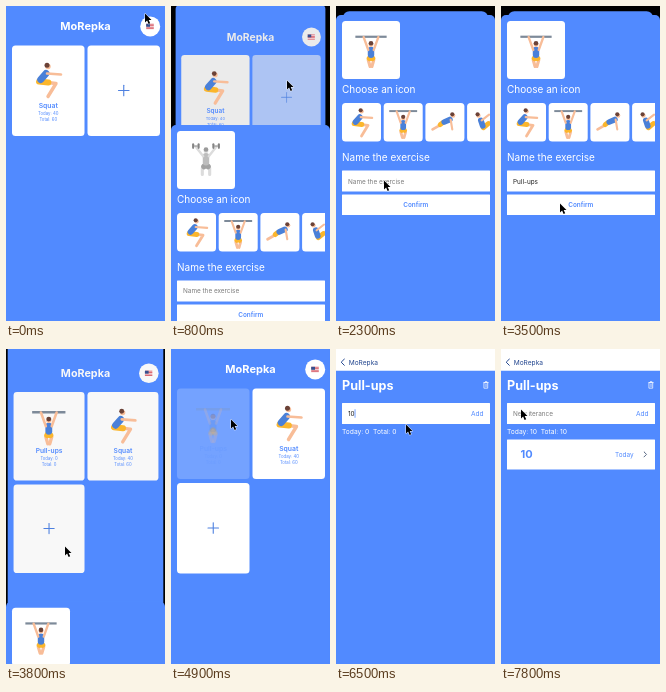
Animation of 159x315 px, one loop 8000 ms. Source, as an HTML page with a canvas:

```html
<!DOCTYPE html>
<html lang="en">
<head>
<meta charset="utf-8">
<title>Workout tracker</title>
<style>
  html, body { margin: 0; width: 100%; height: 100%; overflow: hidden; background: #000; }
  canvas { display: block; width: 159px; height: 315px; }
</style>
</head>
<body>
<canvas id="stage"></canvas>
<script>
const W = 159, H = 315, LOOP = 8000, STEP = 100;
const BLUE = '#518aff', NAVY = '#23468f', APP = 'MoRepka';
const COLORED = { skin: '#f8bd98', shirt: '#4a80d8', shorts: '#fbb62c', hair: '#6b4237', gear: '#7d8a99' };
const GRAY = { skin: '#dcdcdc', shirt: '#bdbdbd', shorts: '#a2a2a2', hair: '#9a9a9a', gear: '#858585' };
const canvas = document.getElementById('stage');
const ctx = canvas.getContext('2d');
const dpr = window.devicePixelRatio || 1;
canvas.width = W * dpr;
canvas.height = H * dpr;

// Critically damped spring from 0 to 1
const spring = (ms, speed) => {
  const k = Math.max(0, ms) / 1000 * speed;
  return 1 - (1 + k) * Math.exp(-k);
};

const progress = (t, from, to) => Math.min(1, Math.max(0, (t - from) / (to - from)));

// Opacity of a pressed control
const press = (t, start, hold, fade) =>
  t < start ? 1 : 0.2 + 0.8 * progress(t, start + hold, start + hold + fade);

function group(draw, { x = 0, y = 0, scale = 1, alpha = 1 } = {}) {
  ctx.save();
  ctx.translate(x, y);
  ctx.scale(scale, scale);
  ctx.globalAlpha *= alpha;
  draw();
  ctx.restore();
}

function box(x, y, w, h, color, r = 0) {
  ctx.fillStyle = color;
  ctx.beginPath();
  ctx.roundRect(x, y, w, h, r);
  ctx.fill();
}

function dot(x, y, r, color) {
  ctx.fillStyle = color;
  ctx.beginPath();
  ctx.arc(x, y, r, 0, 7);
  ctx.fill();
}

function line(color, width, ...points) {
  ctx.strokeStyle = color;
  ctx.lineWidth = width;
  ctx.lineCap = ctx.lineJoin = 'round';
  ctx.beginPath();
  for (const [x, y] of points) ctx.lineTo(x, y);
  ctx.stroke();
}

function text(str, x, y, size, color, weight = 400, align = 'left') {
  ctx.font = `${weight} ${size}px Inter, Roboto, sans-serif`;
  ctx.textAlign = align;
  ctx.fillStyle = color;
  ctx.fillText(str, x, y);
}

// A figure posed by its joints; frontal poses mirror arms and legs
function person({ head, shoulder, hip, knee, foot, hand, frontal }, colors) {
  const sides = frontal ? [-1, 1] : [1];
  const flip = ([x, y], side) => [x * side, y];
  const thigh = hip.map((v, i) => v + (knee[i] - v) * 0.55);
  for (const side of sides) {
    line(colors.skin, 3.4, hip, flip(knee, side), flip(foot, side));
    line(colors.shorts, 6, hip, flip(thigh, side));
  }
  line(colors.shirt, 7, shoulder, hip.map((v, i) => v + (shoulder[i] - v) * 0.25));
  for (const side of sides) line(colors.skin, 2.6, [shoulder[0] + (frontal ? 3 * side : 1), shoulder[1]], flip(hand, side));
  dot(...head, 2.7, colors.skin);
  dot(head[0] - (frontal ? 0 : 1), head[1] - 1.3, 2.5, colors.hair);
}

const poses = {
  squat: { head: [0, -13], shoulder: [-2, -6], hip: [-9, 2], knee: [8, 4], foot: [0, 17], hand: [13, -5] },
  pullUps: { head: [0, -5], shoulder: [0, 1], hip: [0, 8], knee: [3, 12], foot: [1, 19], hand: [8, -13], frontal: true },
  pushUps: { head: [10, -8], shoulder: [6, -3], hip: [-3, 1], knee: [-8, 5], foot: [-15, 9], hand: [9, 9] },
  sitUps: { head: [-10, -8], shoulder: [-7, -2], hip: [-4, 7], knee: [7, -2], foot: [13, 10], hand: [3, -9] },
  weights: { head: [0, -9], shoulder: [0, -3], hip: [0, 6], knee: [4, 10], foot: [4, 17], hand: [11, -13], frontal: true }
};

function icon(name, x, y, scale) {
  const colors = name === 'weights' ? GRAY : COLORED;
  group(() => {
    if (name === 'pullUps') box(-17, -14.5, 34, 2.4, colors.gear);
    person(poses[name], colors);
    if (name !== 'weights') return;
    for (const side of [-1, 1]) {
      line(colors.gear, 1.2, [side * 8, -14], [side * 14, -14]);
      for (const end of [8, 14]) line(colors.gear, 2.2, [side * end, -16], [side * end, -12]);
    }
  }, { x, y, scale });
}

function card(x, y, paper, alpha, content) {
  group(() => { box(0, 0, 72.5, 90.5, paper, 3.5); content(); }, { x, y, alpha });
}

function exercise(name, today, total, image) {
  icon(image, 36, 34, 1);
  text(name, 36.25, 62, 6.8, BLUE, 600, 'center');
  text('Today: ' + today, 36.25, 69.4, 4.3, BLUE, 400, 'center');
  text('Total: ' + total, 36.25, 75.6, 4.3, BLUE, 400, 'center');
}

function plus() {
  line('#4d80e0', 1.1, [31, 45], [41.5, 45]);
  line('#4d80e0', 1.1, [36.25, 39.8], [36.25, 50.2]);
}

function flag() {
  box(140.2, 17.8, 7.6, 5.4, '#fff', 0.6);
  for (let i = 0; i < 4; i++) box(140.2, 17.8 + i * 1.5, 7.6, 0.8, '#d0404c');
  box(140.2, 17.8, 3.8, 3, '#35508f');
}

// depth: how far the page has receded behind the sheet
function home(t, depth, shift) {
  const light = 255 - 30 * depth;
  const paper = `rgb(${light}, ${light}, ${light})`;
  const squat = () => exercise('Squat', 40, 60, 'squat');
  group(() => {
    ctx.translate(-79.5, -158);
    box(0, -14, W, 344, BLUE, 7 * depth);
    text(APP, 79.5, 24.3, 11, paper, 700, 'center');
    dot(144.2, 20.4, 10, paper);
    flag();
    if (t < 3400) {
      card(6, 39.5, paper, 1, squat);
      card(81.5, 39.5, paper, press(t, 600, 0, 400), plus);
    } else {
      card(6, 39.5, paper, press(t, 4800, 150, 400), () => exercise('Pull-ups', 0, 0, 'pullUps'));
      card(81.5, 39.5, paper, 1, squat);
      card(6, 134, paper, 1, plus);
    }
  }, { x: 79.5 + shift, y: 158 + 4 * depth, scale: 1 - 0.088 * depth });
}

function field(y, value, placeholder, caret) {
  box(6, y, 148, 21, '#fff', 0.5);
  text(value || placeholder, 12, y + 13, 6.4, value ? '#222' : '#7b7b7b');
  if (caret) {
    const end = value ? ctx.measureText(value).width + 0.4 : 0;
    box(11.6 + end, y + 6.3, 0.8, 8.4, BLUE);
  }
}

function sheet(t, depth) {
  group(() => {
    box(0, 9, W, 340, BLUE, [5, 5, 0, 0]);
    box(6, 15, 58, 58, '#fff', 3.5);
    icon(t < 1600 ? 'weights' : 'pullUps', 35, 43, 0.92);
    text('Choose an icon', 6, 87.2, 10, '#fff');
    ctx.save();
    ctx.beginPath();
    ctx.rect(6, 96, 148, 41);
    ctx.clip();
    ['squat', 'pullUps', 'pushUps', 'sitUps'].forEach((name, i) => {
      group(() => {
        box(0, 0, 39, 38.5, '#fff', 3.5);
        icon(name, 19.5, 19, 0.82);
      }, { x: 6 + 41.7 * i, y: 97, alpha: i === 1 ? press(t, 1500, 0, 100) : 1 });
    });
    ctx.restore();
    text('Name the exercise', 6, 155.2, 10, '#fff');
    const typed = t < 2900 ? 0 : 2 * (Math.floor((t - 2900) / 100) + 1);
    field(164.5, 'Pull-ups'.slice(0, typed), 'Name the exercise', t >= 2700 && t < 3500);
    box(6, 188.5, 148, 20.5, '#fff', 0.5);
    text('Confirm', 79.8, 201, 6.4, BLUE, 600, 'center');
  }, { y: 321 * (1 - depth) });
}

function trash(x, y) {
  group(() => {
    line('#fff', 0.7, [-2.3, 0], [2.3, 0]);
    line('#fff', 0.7, [-0.8, -1], [0.8, -1]);
    ctx.strokeRect(-1.7, 0, 3.4, 5.6);
    for (const bar of [-0.6, 0.6]) line('#fff', 0.4, [bar, 1.5], [bar, 4.2]);
  }, { x, y });
}

// side -1 points left, 1 points right
const chevron = (x, y, size, side, color) =>
  line(color, 1, [x - side * size, y - size], [x, y], [x - side * size, y + size]);

function detail(t, x) {
  const added = t >= 7200, reps = added ? 10 : 0;
  group(() => {
    box(0, 0, W, H, BLUE);
    box(0, 0, W, 21.7, '#fff');
    chevron(5.2, 13.2, 3.1, -1, NAVY);
    text(APP, 12.7, 15.6, 6.6, NAVY);
    text('Pull-ups', 6, 40.7, 12.6, '#fff', 700);
    trash(150, 33.6);
    const value = added || t < 6100 ? '' : t < 6500 ? '1' : '10';
    field(54, value, 'New iterance', t >= 5800 && !added);
    group(() => text('Add', 147.5, 67, 6.6, BLUE, 400, 'right'), { alpha: press(t, 7100, 0, 200) });
    text(`Today: ${reps}  Total: ${reps}`, 6, 84.9, 6.7, '#fff');
    if (added) {
      box(6, 90.5, 148, 30, '#fff', 0.5);
      text('10', 19.6, 109.3, 11, BLUE, 700);
      text('Today', 132.5, 107.7, 6.4, BLUE, 400, 'right');
      chevron(145.5, 105.4, 2.5, 1, '#5b6b85');
    }
  }, { x });
}

const moves = [
  { from: 0, to: 400, x: 116, y: 74 },
  { from: 800, to: 1600, x: 67, y: 112 },
  { from: 1700, to: 2300, x: 48, y: 174 },
  { from: 3000, to: 3300, x: 59, y: 197 },
  { from: 3800, to: 4300, x: 97, y: 132 },
  { from: 4300, to: 4600, x: 60, y: 70 },
  { from: 4900, to: 5300, x: 70, y: 75 },
  { from: 6700, to: 6800, x: 130, y: 66 },
  { from: 7200, to: 7800, x: 20, y: 60 }
];

function pointer(t) {
  let x = 139, y = 7;
  for (const move of moves) {
    const k = progress(t, move.from, move.to);
    x += (move.x - x) * k;
    y += (move.y - y) * k;
  }
  group(() => {
    const arrow = new Path2D('M0 0V10.2L2.4 8 4.1 12 5.9 11.2 4.2 7.4 7.4 7.3Z');
    ctx.lineWidth = 1;
    ctx.strokeStyle = '#fff';
    ctx.stroke(arrow);
    ctx.fillStyle = '#000';
    ctx.fill(arrow);
  }, { x, y: y + 0.5, scale: 0.88 });
}

function render(t) {
  ctx.setTransform(dpr, 0, 0, dpr, 0, 0);
  box(0, 0, W, H, '#000');
  const depth = Math.max(0, spring(t - 558, 9.3) - spring(t - 3505, 9.3));
  const pushed = spring(t - 4920, 19);
  home(t, depth, -48 * pushed);
  if (depth > 0.002) sheet(t, depth);
  if (pushed > 0) detail(t, W * (1 - pushed));
  pointer(t);
}

function tick(now) {
  render(Math.floor(now % LOOP / STEP) * STEP);
  requestAnimationFrame(tick);
}
requestAnimationFrame(tick);
</script>
</body>
</html>
```
